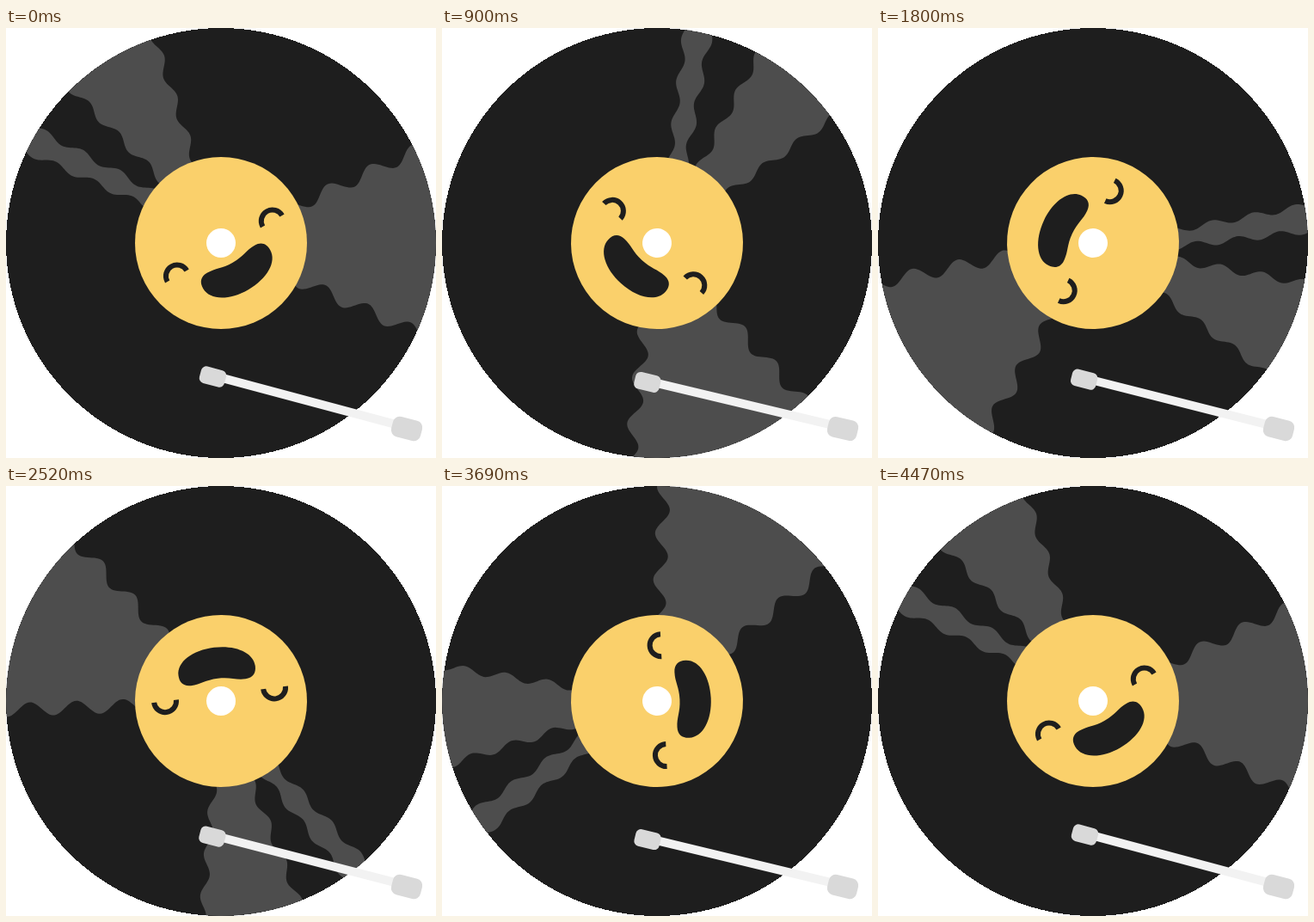
These frames come from a looping animation (500x500 px, 4500 ms). An HTML page:

```html
<!DOCTYPE html>
<html lang="en">
<head>
<meta charset="utf-8">
<title>Happy record</title>
<style>
  html, body { margin: 0; width: 100%; height: 100%; overflow: hidden; background: #fff; }
  svg { display: block; width: 100vw; height: 100vh; }
</style>
</head>
<body>
<svg viewBox="0 0 500 500">
  <defs>
    <clipPath id="rim"><circle cx="250" cy="250" r="250"/></clipPath>
  </defs>
  <circle cx="250" cy="250" r="250" fill="#1e1e1e" shape-rendering="crispEdges"/>
  <g id="disc">
    <g id="shine" fill="#4d4d4d" clip-path="url(#rim)"></g>
    <circle cx="250" cy="250" r="100" fill="#fad06b"/>
    <g transform="translate(250 250) rotate(-30) translate(.5 -.5)">
      <g fill="none" stroke="#1e1e1e" stroke-width="6">
        <path d="M-77 8.3a13 13 0 0 1 26 0"/>
        <path d="M51 8.3a13 13 0 0 1 26 0"/>
      </g>
      <path fill="#1e1e1e" d="M0 27C15 27 20 22.5 32 22.5C41 22.5 45 28 45 36C45 52 25 63.3 0 63.3C-25 63.3 -45 52 -45 36C-45 28 -41 22.5 -32 22.5C-20 22.5 -15 27 0 27Z"/>
    </g>
    <circle cx="250" cy="250" r="17" fill="#fff"/>
  </g>
  <g id="arm">
    <rect x="-222" y="-6.5" width="210" height="10" fill="#f2f2f2"/>
    <rect x="-248.5" y="-10" width="30" height="20" rx="6" fill="#d9d9d9"/>
    <rect x="-17.5" y="-12" width="35" height="24" rx="8" fill="#d9d9d9"/>
  </g>
</svg>
<script>
  const LOOP = 4500, STEP = 30, LAST = LOOP / STEP - 1;
  const $ = id => document.getElementById(id);

  // A wavy edge that follows the line from label (x0, y0) to rim (x1, y1);
  // crest is the distance of its first wave top from the label.
  function edge(x0, y0, x1, y1, crest, amp, wave) {
    const len = Math.hypot(x1 - x0, y1 - y0);
    const dx = (x1 - x0) / len, dy = (y1 - y0) / len;
    const pts = [];
    for (let s = -20; s <= 200; s += 2) {
      const off = amp * Math.cos(2 * Math.PI * (s - crest) / wave);
      pts.push([x0 + dx * s - dy * off, y0 + dy * s + dx * off]);
    }
    return pts;
  }

  // A reflection fills the space between two edges.
  function addShine(amp, wave, one, two) {
    const pts = [...edge(...one, amp, wave), ...edge(...two, amp, wave).reverse()];
    const shape = document.createElementNS('http://www.w3.org/2000/svg', 'polygon');
    shape.setAttribute('points', pts.map(p => p.map(v => v.toFixed(2))).join(' '));
    $('shine').append(shape);
  }

  addShine(8, 54, [340, 206, 476, 143, 14], [340, 294, 475, 353, 4]);
  addShine(4.5, 49, [184, 180, 78, 73, 30], [222, 163, 173, 13, 38]);
  addShine(3.7, 49, [172.5, 190.5, 37.5, 118, 47], [161, 206, 26, 145, 17]);

  function draw(time) {
    const p = Math.floor((time % LOOP) / STEP) / LAST;
    const sway = Math.abs(1 - 2 * ((2 * p) % 1)); // 1 to 0 to 1, twice per loop
    $('disc').setAttribute('transform', `rotate(${360 * p} 250 250)`);
    $('arm').setAttribute('transform', `translate(466 466) rotate(${13 + 2 * sway})`);
  }

  function tick() {
    draw(performance.now());
    requestAnimationFrame(tick);
  }
  tick();
</script>
</body>
</html>
```
